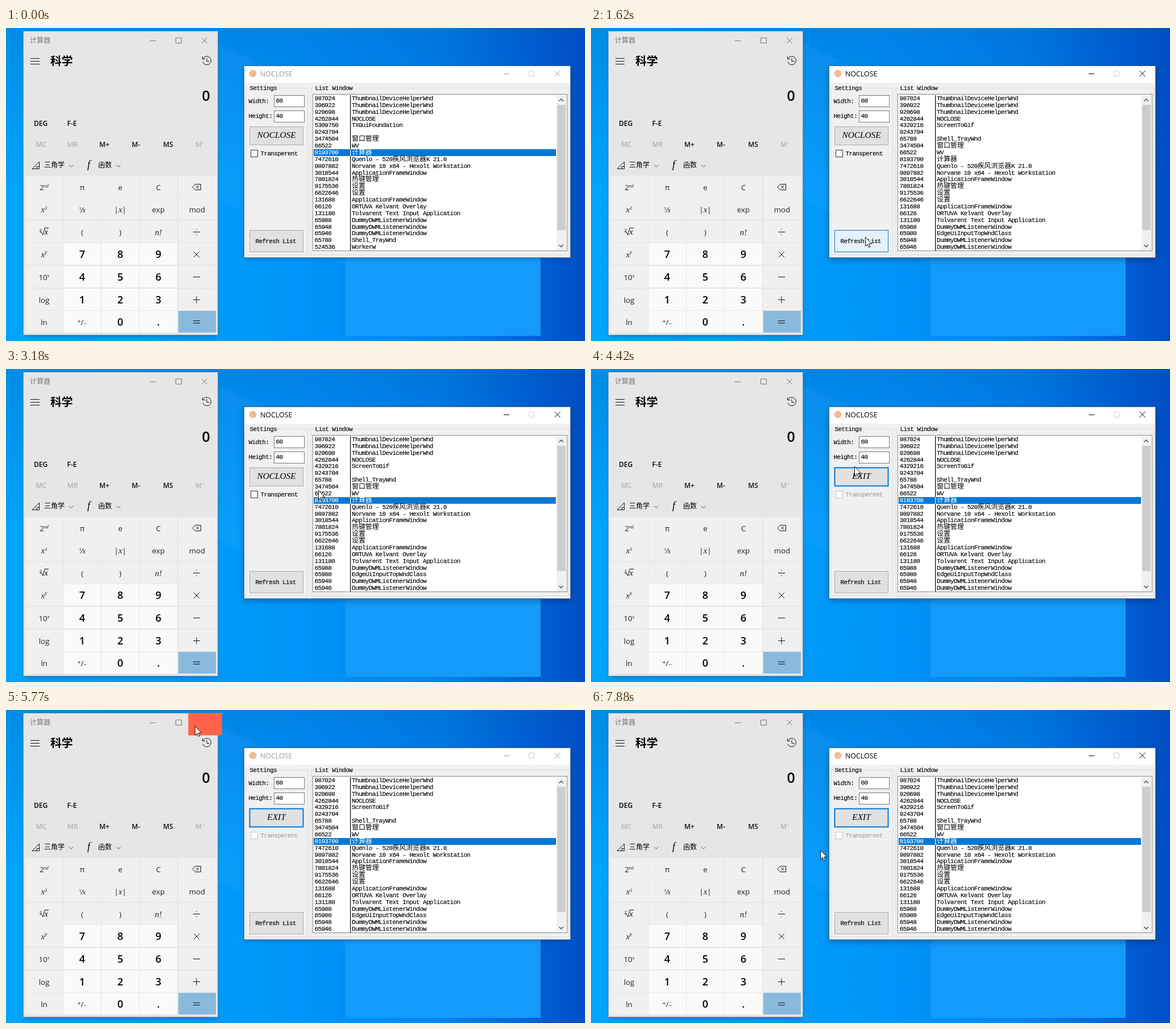
An HTML page for the animation above (8000 ms loop, 1018 px wide and 550 px high).

```html
<!DOCTYPE html>
<html lang="zh">
<head>
<meta charset="utf-8">
<title>NOCLOSE</title>
<style>
html, body { margin: 0; width: 100%; height: 100%; overflow: hidden; background: #0096f8 }
svg { display: block; width: 1018px; height: 550px }
text { font-family: "Open Sans", "Noto Sans CJK SC", "Noto Sans CJK", sans-serif; white-space: pre }
.mono { font-family: "Liberation Mono", monospace; font-size: 11px; letter-spacing: -.65px; stroke: currentColor; stroke-width: .15px; fill: currentColor }
.cjk { font-family: "Noto Sans CJK SC", "Noto Sans CJK", sans-serif; font-size: 11.9px; letter-spacing: 0; stroke: none }
.it { font-family: "Liberation Serif", serif; font-style: italic }
.line { fill: none; stroke: #111; stroke-width: 1 }
</style>
</head>
<body>
<svg id="stage" viewBox="0 0 1018 550"></svg>
<script>
const LOOP = 8000;
const stage = document.getElementById('stage');

const rect = (x, y, w, h, fill, extra = '') =>
  `<rect x="${x}" y="${y}" width="${w}" height="${h}" fill="${fill}" ${extra}/>`;
const frame = (x, y, w, h, fill, stroke, extra = '') =>
  rect(x + .5, y + .5, w - 1, h - 1, fill, `stroke="${stroke}" ${extra}`);
const line = (d, extra = '') => `<path class="line" d="${d}" ${extra}/>`;
const text = (x, y, s, size, extra = '') =>
  `<text x="${x}" y="${y}" font-size="${size}" ${extra}>${s}</text>`;
const mid = (x, y, s, size, extra = '') => text(x, y, s, size, 'text-anchor="middle" ' + extra);
const mono = (x, y, s, extra = '') =>
  `<text class="mono" x="${x}" y="${y}" ${extra}>${s.replace(/[\u4e00-\u9fff]+/g, m => `<tspan class="cjk">${m}</tspan>`)}</text>`;
const sup = (s, size = 9, dy = -5) => `<tspan font-size="${size}" dy="${dy}">${s}</tspan>`;

function desktop() {
  return `<defs>
    <linearGradient id="sky"><stop offset="0" stop-color="#00a4fa"/><stop offset=".5" stop-color="#0096f9"/>
      <stop offset=".75" stop-color="#0084ec"/><stop offset=".93" stop-color="#005cd2"/><stop offset="1" stop-color="#004fc4"/></linearGradient>
    <linearGradient id="dusk" x2="0" y2="1"><stop offset="0" stop-color="#0050b8" stop-opacity=".28"/>
      <stop offset=".5" stop-color="#0050b8" stop-opacity="0"/></linearGradient>
    </defs>` +
    rect(0, 0, 1018, 550, 'url(#sky)') + rect(0, 0, 1018, 550, 'url(#dusk)') +
    '<path d="M372 28L600 130V420L372 300Z" fill="#4ab4ff" opacity=".12"/>' +
    rect(597, 200, 343, 341, '#149af8');
}

function calculator() {
  const bold = 'font-weight="600"';
  let s = rect(33, 10, 337, 531, '#000', 'opacity=".3" style="filter:blur(4px)"') +
    frame(30, 5, 343, 535, '#e6e6e6', '#7f97aa') +
    text(42, 26, '计算器', 12, 'fill="#777"') +
    line('M253 22.5h10M298.5 17.5h10v9h-10zM344 17l10 10m0-10l-10 10', 'style="stroke:#777"') +
    line('M43 53.5h16M43 58.5h16M43 63.5h16') +
    text(78, 65, '科学', 19.8, 'font-weight="700"') +
    line('M346.5 53.5a7.5 7.5 0 1 1-.6 6M345.5 50v4.5h4.5M353 53v5.5h4.5', 'stroke-linejoin="round"') +
    text(344.5, 127.5, '0', 25, bold) +
    text(49, 172, 'DEG', 12, bold) + text(107.5, 172, 'F-E', 12, bold);
  ['MC', 'MR', 'M+', 'M-', 'MS', 'M'].forEach((m, i) => {
    const off = i < 2 || i > 4;
    s += mid([62, 117, 173, 228.5, 285, 338.5][i], 208.5, m, 12, `${bold} fill="${off ? '#b2b2b2' : '#111'}"`);
  });
  s += line('M344.5 201l2 2 2-2', 'style="stroke:#b2b2b2"') +
    line('M46 247.5h12.5V235zM54 247v-3.5h4') + text(67, 245, '三角学', 12) +
    line('M111 240.5l3.7 3.7 3.7-3.7M194 240.5l3.7 3.7 3.7-3.7', 'style="stroke:#555"') +
    text(143, 246, 'f', 18, 'class="it"') + text(162, 245, '函数', 12);

  const it = (v, size = 15) => `<tspan class="it" font-size="${size}">${v}</tspan>`;
  const keys = [
    ['2' + sup(it('nd', 8)), 'π', 'e', 'C', ''],
    [it('x') + sup('2', 8), sup('1', 8, -4) + '<tspan dy="4">⁄</tspan>' + it('x', 12), '|' + it('x') + '|', 'exp', 'mod'],
    ['', '(', ')', it('n!'), ''],
    [it('x') + sup(it('y', 10), 9, -6), '7', '8', '9', ''],
    ['10' + sup(it('x', 9)), '4', '5', '6', ''],
    ['log', '1', '2', '3', ''],
    ['ln', sup('+', 10, -3) + '<tspan dy="3">/</tspan>' + sup('−', 10, 1), '0', '.', '']
  ];
  keys.forEach((row, r) => row.forEach((label, c) => {
    const x = Math.floor(34 + 67.25 * c), y = Math.floor(260.3 + 39.55 * r);
    const pad = r > 2 && c > 0 && c < 4, digit = pad && !(r == 6 && c == 1);
    s += rect(x, y, 66, 38, r == 6 && c == 4 ? '#8ab9de' : pad ? '#fafafa' : '#f0f0f0');
    if (label) s += mid(x + 33, y + (digit ? 25.5 : 24.5), label, digit ? 18 : 13.3, digit ? bold : 'fill="#222"');
  }));
  return s +
    text(58.5, 357.5, '2', 8) + line('M60 359.5l2-1 3 5 3-12h7') + text(67.5, 363, 'x', 14, 'class="it"') +
    line('M328 279.5l4.5-5h10v10h-10zM334 277l5 5m0-5l-5 5') +
    line('M329 358.5h12M335 353v1.5M335 362.5v1.5', 'stroke-width="1.2"') +
    line('M330 393l10 10m0-10l-10 10M329 437.5h12M329 477.5h12m-6-6v12M329 514.5h12M329 518.5h12');
}

function tool() {
  const box = 'fill="none" stroke="#dcdcdc"';
  const label = (x, y, w, s) => rect(x - 1, y - 8, w, 10, '#f0f0f0') + mono(x, y, s);
  const field = (y, s) => frame(471, y, 54, 21, '#fff', '#7a7a7a') + mono(474.5, y + 13, s);
  return '<rect id="shade"/>' +
    frame(418, 66, 575, 338, '#f0f0f0', '#4c6f92') + rect(419, 67, 573, 29, '#fff') +
    '<circle cx="434" cy="80" r="6.5" fill="#f0bd98"/>' +
    text(447, 84.5, 'NOCLOSE', 12.4, 'id="title"') +
    line('M875 80.5h10M964.5 75l10 10m0-10l-10 10', 'id="caption"') +
    line('M919.5 75.5h9v9h-9z', 'style="stroke:#d0d0d0"') +
    `<rect x="421.5" y="105.5" width="109" height="293" ${box}/><rect x="536.5" y="105.5" width="453" height="293" ${box}/>` +
    label(428.5, 108.5, 50, 'Settings') + label(543.5, 108.5, 67, 'List Window') +
    mono(426.5, 131.5, 'Width:') + field(118, '60') +
    mono(426.5, 158, 'Height:') + field(145, '40') +
    '<rect id="go" x="428.5" y="173.5" width="94" height="32"/>' +
    mid(475.5, 192.5, 'NOCLOSE', 15.3, 'id="goText" class="it"') +
    '<rect id="tick" x="430.5" y="214.5" width="12" height="12" fill="#fff"/>' +
    mono(447.5, 223.5, 'Transperent', 'id="tickText"') +
    '<rect id="refresh" x="428.5" y="355.5" width="94" height="38"/>' +
    mono(438.5, 377.5, 'Refresh List') +
    frame(539, 116, 448, 276, '#fff', '#82878f') +
    rect(968, 118, 17, 273, '#f0f0f0') + rect(969, 135, 15, 220, '#cdcdcd') +
    line('M972.5 128.5l3.7-3.7 3.7 3.7M972.5 381l3.7 3.7 3.7-3.7', 'style="stroke:#555;stroke-width:1.6"') +
    '<g id="list"></g>';
}

const thumb = 'ThumbnailDeviceHelperWnd', app = 'ApplicationFrameWindow', dummy = 'DummyDWMListenerWindow';
const head = [[987024, thumb], [396922, thumb], [920698, thumb], [4262844, 'NOCLOSE']];
const blank = [9243704, ''], tray = [65788, 'Shell_TrayWnd'];
const body = [
  [3474504, '窗口管理'], [66522, 'WV'], [8193700, '计算器'], [7472610, 'Quenlo - 520疾风浏览器K 21.0'],
  [9897882, 'Norvane 10 x64 - Hexolt Workstation'], [3018544, app], [7801824, '热键管理'],
  [9175536, '设置'], [6622646, '设置'], [131688, app], [66126, 'ORTUVA Kelvant Overlay'],
  [131180, 'Tolvarent Text Input Application'], [65988, dummy]
];
const tail = [[65948, dummy], [65946, dummy]];
const lists = [
  [...head, [5309750, 'TXGuiFoundation'], blank, ...body, ...tail, tray, [524536, 'WorkerW']],
  [...head, [4329216, 'ScreenToGif'], blank, tray, ...body, [65980, 'EdgeUiInputTopWndClass'], ...tail]
];
const rows = (items, sel, focus) => items.map(([id, name], i) => {
  const y = Math.round(118 + 11.87 * i), ink = i == sel ? '#fff' : '#000';
  const bar = frame(541, y, 426, 12, '#0078d7', focus ? '#ff8728' : '#0078d7', 'stroke-dasharray="1 1"');
  return (i == sel ? rect(541, y, 426, 12, '#0078d7') + bar : '') +
    rect(605, y, 1.2, 12, ink) +
    `<g style="color:${ink}" fill="${ink}">${mono(542.5, y + 9.3, '' + id)}${mono(608, y + 9.3, name)}</g>`;
}).join('');

stage.innerHTML = desktop() + calculator() + tool() +
  rect(320.5, 5, 59.5, 39.5, '#ff6347', 'id="block"') +
  '<path id="cursor" d="M.5.5V16.5L4.2 13 6.6 18.5 8.9 17.5 6.5 12.1H11.5Z" fill="#fff" stroke="#000" stroke-width=".9"/>';
const $ = id => document.getElementById(id);
const set = (id, attrs) => { for (const k in attrs) $(id).setAttribute(k, attrs[k]); };

// Pointer bursts: start, end, number of jumps, then the path
const moves = [
  [520, 1310, 11, [868, 476], [800, 458], [650, 412], [520, 376], [482, 367]],
  [2160, 2710, 8, [488, 352], [515, 300], [585, 230], [620, 217], [631, 228]],
  [3020, 3180, 3, [610, 226], [575, 217], [549, 213]],
  [3410, 3820, 6, [540, 211], [495, 196], [478, 203]],
  [4110, 4190, 2, [478, 194], [478, 181]],
  [4420, 5060, 9, [463, 171], [400, 85], [362, 38], [353, 23]],
  [5230, 5380, 3, [348, 20], [332, 11]],
  [5530, 5850, 5, [305, 14], [277, 21], [300, 26], [332, 28], [345, 28]],
  [6020, 6320, 5, [308, 28], [286, 27], [302, 26], [332, 26], [348, 26]],
  [6480, 6710, 4, [317, 27], [299, 28], [348, 28], [352, 27]],
  [6860, 7640, 11, [354, 36], [358, 56], [364, 74], [356, 40], [350, 24], [354, 26]],
  [7720, 7880, 3, [370, 110], [392, 200], [403, 246]]
];
const jumps = moves.flatMap(([from, to, n, ...path]) => Array.from({ length: n }, (_, k) => {
  const u = k / (n - 1), p = u * (path.length - 1), i = Math.min(Math.floor(p), path.length - 2), f = p - i;
  const [a, b] = [path[i], path[i + 1]];
  return { t: from + (to - from) * u, x: a[0] + (b[0] - a[0]) * f, y: a[1] + (b[1] - a[1]) * f };
}));

const between = (t, a, b) => t >= a && t < b;
const inside = (p, x, y, w, h) => between(p.x, x, x + w) && between(p.y, y, y + h);
function button(id, hover, down, focus) {
  set(id, {
    fill: down ? '#cce4f7' : hover ? '#e5f1fb' : '#e1e1e1',
    stroke: down ? '#005499' : hover || focus ? '#0078d7' : '#adadad',
    'stroke-width': focus ? 2 : 1
  });
}

let shown = '';
function draw(t) {
  const p = jumps.findLast(j => j.t <= t + .01) || { x: -99, y: -99 };
  const blocked = t >= 4420 && inside(p, 321, 5, 59, 39);
  const active = t >= 1390 && !blocked, exit = t >= 3960;
  const fresh = t >= 1540 ? 1 : 0, sel = !fresh ? 8 : t >= 2710 ? 9 : -1;

  set('cursor', { transform: `translate(${Math.round(p.x)} ${Math.round(p.y)})` });
  $('block').style.display = blocked ? '' : 'none';
  set('title', { fill: active ? '#000' : '#999' });
  $('caption').style.stroke = active ? '#000' : '#999';
  set('shade', active ? { x: 418, y: 71, width: 575, height: 336 } : { x: 419, y: 69, width: 573, height: 336 });
  $('shade').style.cssText = active ? 'filter:blur(6px);opacity:.3' : 'filter:blur(4px);opacity:.24';

  button('go', inside(p, 428, 173, 95, 33), false, exit);
  $('goText').textContent = exit ? 'EXIT' : 'NOCLOSE';
  set('tick', { stroke: exit ? '#c4c4c4' : '#333' });
  $('tickText').style.color = exit ? '#a0a0a0' : '#000';
  button('refresh', inside(p, 428, 355, 95, 39), between(t, 1390, 1540) || between(t, 1930, 2020), false);

  const focus = active && !exit, key = [fresh, sel, focus].join();
  if (key != shown) {
    $('list').innerHTML = rows(lists[fresh], sel, focus);
    shown = key;
  }
}

const start = performance.now();
function tick() {
  draw((performance.now() - start) % LOOP);
  requestAnimationFrame(tick);
}
tick();
</script>
</body>
</html>
```
